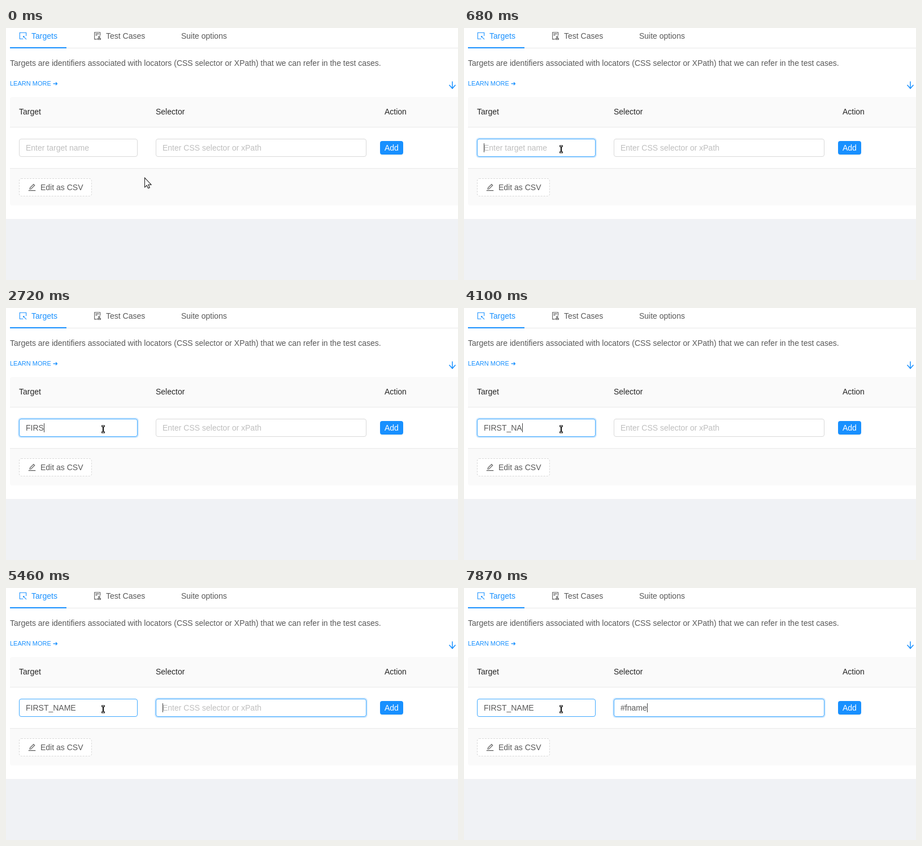
These frames come from a looping animation (800x446 px, 8000 ms). An HTML page:

```html
<!DOCTYPE html>
<html lang="en">
<head>
<meta charset="utf-8">
<title>Targets form</title>
<style>
html, body { margin: 0; width: 100%; height: 100%; overflow: hidden; background: #fff; }
svg { display: block; font: 14px "Liberation Sans", Arial, sans-serif; fill: #595959; }
text { white-space: pre; }
.blue { fill: #1890ff; }
.head { fill: #262626; }
.line { fill: #e8e8e8; }
.pale { fill: #fafafa; }
.icon { fill: none; stroke: #595959; stroke-width: 70; }
.icon.active { stroke: #1890ff; }
.icon .solid { fill: #1890ff; stroke: none; }
</style>
</head>
<body>
<svg width="800" height="446" viewBox="0 0 800 446">
  <rect width="800" height="446" fill="#fff"/>
  <rect y="338" width="800" height="108" fill="#f0f2f5"/>

  <!-- tabs -->
  <rect class="line" x="7" y="35" width="793" height="1"/>
  <rect class="blue" x="7" y="34" width="100" height="2"/>
  <g class="icon active" transform="translate(23 7) scale(.015625) translate(-64 -64)">
    <path d="M544 844H148V148H876V508M600 600L898 898"/>
    <path class="solid" d="M510 510L712 536L536 712Z"/>
  </g>
  <text class="blue" x="45" y="19">Targets</text>
  <g class="icon" transform="translate(155 7) scale(.015625) translate(-64 -64)">
    <path d="M440 888H172V112H804V476M288 282H688M288 426H488M696 700V780"/>
    <circle cx="696" cy="620" r="81"/>
    <rect x="535" y="795" width="322" height="122"/>
  </g>
  <text x="177" y="19">Test Cases</text>
  <text x="310" y="19">Suite options</text>

  <text x="7" y="67">Targets are identifiers associated with locators (CSS selector or XPath) that we can refer in the test cases.</text>
  <text class="blue" x="7" y="102" font-size="11">LEARN MORE ➜</text>
  <path d="M790 94.5V106.5M784.5 100.8L790 107L795.5 100.8" fill="none" stroke="#1890ff" stroke-width="1.5"/>

  <!-- table -->
  <path class="pale" d="M800 122H11a4 4 0 0 0-4 4V175H800Z"/>
  <rect class="line" x="7" y="175" width="793" height="1"/>
  <text class="head" x="23" y="153">Target</text>
  <text class="head" x="265" y="153">Selector</text>
  <text class="head" x="670" y="153">Action</text>
  <rect class="line" x="7" y="248" width="793" height="1"/>
  <path class="pale" d="M7 249H800V314H11a4 4 0 0 1-4-4Z"/>

  <g id="fields"></g>

  <rect x="662" y="202" width="41" height="24" rx="4" fill="#000" opacity=".045"/>
  <rect class="blue" x="662" y="200" width="41" height="24" rx="4"/>
  <text x="670" y="217" fill="#fff">Add</text>

  <rect x="23.5" y="266.5" width="128" height="31" rx="3.5" fill="#fff" stroke="#d9d9d9" stroke-dasharray="3 2"/>
  <g class="icon" transform="translate(39 275) scale(.015625) translate(-64 -64)">
    <path d="M112 874H912M262 710L292 560L688 164L812 288L416 684Z"/>
  </g>
  <text x="61" y="287">Edit as CSV</text>

  <rect id="caret" y="204" width="1" height="16" fill="#404040"/>

  <!-- pointers -->
  <g id="arrow">
    <path d="M246.5 266.5V283L250 280L252.5 285L255.5 283.8L253.5 279H258Z" opacity=".15"/>
    <path d="M245.5 265.2V281.8L249.2 278.4L251.6 283.6L254.2 282.5L251.9 277.3H257Z" fill="#fff" stroke="#222" stroke-width="1.1"/>
  </g>
  <g id="beam" fill="none">
    <path d="M168.5 209H175.5M168.5 220H175.5M172 209V220" stroke="#fff" stroke-width="4.4"/>
    <path d="M169 209H175M169 220H175" stroke="#111" stroke-width="3"/>
    <path d="M172 209V220" stroke="#111" stroke-width="2.2"/>
    <path d="M170 209H174M170 220H174" stroke="#fff" stroke-width="1"/>
  </g>
</svg>
<script>
const LOOP = 8000;
const $ = id => document.getElementById(id);

function add(parent, tag, attrs) {
  const node = document.createElementNS("http://www.w3.org/2000/svg", tag);
  for (const key in attrs) node.setAttribute(key, attrs[key]);
  return parent.appendChild(node);
}

function makeField(x, width, hint) {
  const g = $("fields");
  const glow = add(g, "rect", { x: x - 2, y: 194, width: width + 4, height: 36, rx: 6, fill: "#1890ff", "fill-opacity": .2 });
  const box = add(g, "rect", { x: x + .5, y: 196.5, width: width - 1, height: 31, rx: 3.5, fill: "#fff" });
  const label = add(g, "text", { x: x + 12, y: 217 });
  return {
    draw(value, lit, focused) {
      glow.style.display = focused ? "" : "none";
      box.style.stroke = lit || focused ? "#40a9ff" : "#d9d9d9";
      label.textContent = value || hint;
      label.style.fill = value ? "#595959" : "#bfbfbf";
    },
    caretX: value => Math.round(x + 12 + (value ? label.getComputedTextLength() : 0))
  };
}

const fields = [makeField(23, 210, "Enter target name"), makeField(265, 373, "Enter CSS selector or xPath")];
const words = ["FIRST_NAME", "#fname"];

// [time, field being typed, typed letters, caret shown]
const steps = [
  [0, 0, 0, 0], [680, 0, 0, 1], [1360, 0, 0, 0], [1690, 0, 1, 1],
  [2390, 0, 3, 1], [2720, 0, 4, 1], [3070, 0, 5, 1], [3420, 0, 6, 1],
  [4100, 0, 8, 1], [4430, 0, 10, 1], [5130, 1, 0, 1], [5810, 1, 0, 0],
  [6490, 1, 1, 1], [6840, 1, 1, 0], [7170, 1, 2, 1], [7520, 1, 4, 1], [7870, 1, 6, 1]
];

function render(t) {
  const [, active, count, caretOn] = steps.findLast(step => step[0] <= t);
  const hover = t >= 330;
  const values = words.map((word, i) => i < active ? word : i === active ? word.slice(0, count) : "");
  fields[0].draw(values[0], hover, t >= 680 && t < 5460);
  fields[1].draw(values[1], false, t >= 5460);

  $("caret").style.display = caretOn ? "" : "none";
  $("caret").setAttribute("x", fields[active].caretX(values[active]));
  $("arrow").style.display = hover ? "none" : "";
  $("beam").style.display = hover ? "" : "none";
}

const start = performance.now();
function tick() {
  render((performance.now() - start) % LOOP);
  requestAnimationFrame(tick);
}
tick();
</script>
</body>
</html>
```
